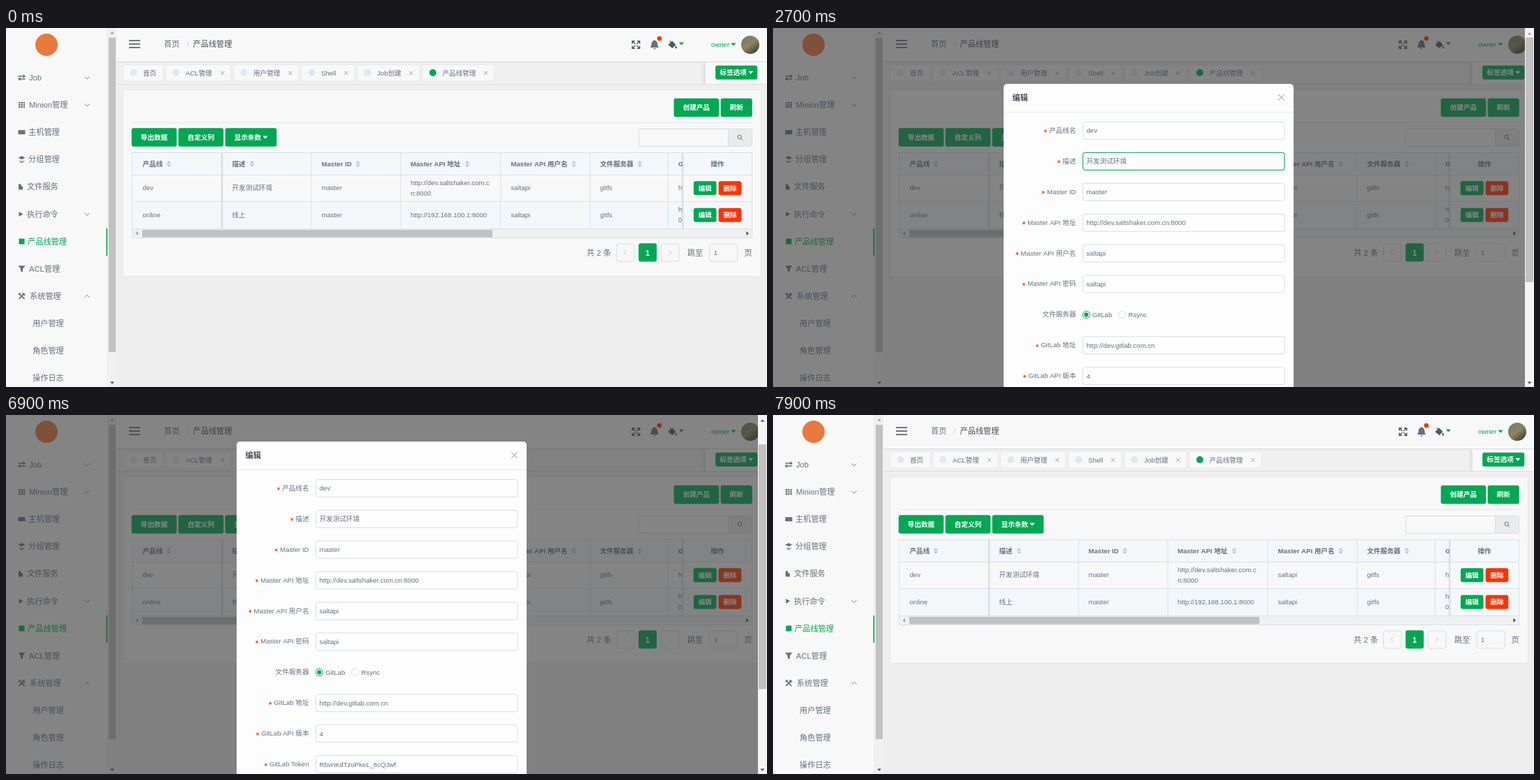
Recreate the animation shown at these times as an HTML page with a canvas. Size 1089 px wide and 514 px high, loop 8000 ms.

```html
<!DOCTYPE html>
<html lang="zh">
<head>
<meta charset="utf-8">
<style>
html, body { margin: 0; width: 100%; height: 100%; overflow: hidden; background: #eee; }
canvas { display: block; width: 1089px; height: 514px; }
</style>
</head>
<body>
<canvas id="stage" width="1089" height="514"></canvas>
<script>
const stage = document.getElementById('stage').getContext('2d');
const layerCanvas = document.createElement('canvas');
layerCanvas.width = 1089;
layerCanvas.height = 514;
const layer = layerCanvas.getContext('2d');
let ctx = stage;

const LOOP = 8000, STEP = 100;
const FONT = '"Liberation Sans", "Noto Sans CJK SC", "Noto Sans CJK", sans-serif';
const GREEN = '#00a854', RED = '#ff3300', TEXT = '#657180', DARK = '#464c5b';
const WHITE = '#f8f8f8', LINE = '#d7dde4', TABLE_LINE = '#d6e2ee', GRAY = '#c1c1c1';
const SMALL = 9.6, LARGE = 11.2;

const clamp = v => Math.max(0, Math.min(1, v));
const smooth = v => { v = clamp(v); return v * v * (3 - 2 * v); };
const ramp = (t, start) => clamp((t - start + STEP) / (2 * STEP));
const pulse = (t, on, off) => Math.min(ramp(t, on), 1 - ramp(t, off));

function rect(x, y, w, h, color) {
  ctx.fillStyle = color;
  ctx.fillRect(x, y, w, h);
}

function box(x, y, w, h, r, fill, stroke) {
  ctx.beginPath();
  ctx.roundRect(x, y, w, h, r);
  if (fill) { ctx.fillStyle = fill; ctx.fill(); }
  if (stroke) { ctx.strokeStyle = stroke; ctx.lineWidth = 1; ctx.stroke(); }
}

function disc(x, y, r, fill, stroke) {
  ctx.beginPath();
  ctx.arc(x, y, r, 0, Math.PI * 2);
  if (fill) { ctx.fillStyle = fill; ctx.fill(); }
  if (stroke) { ctx.strokeStyle = stroke; ctx.lineWidth = 1; ctx.stroke(); }
}

// y is the vertical middle of the line.
function text(s, x, y, { size = SMALL, color = TEXT, bold = false, align = 'left' } = {}) {
  ctx.font = `${bold ? 'bold ' : ''}${size}px ${FONT}`;
  ctx.textAlign = align;
  ctx.fillStyle = color;
  ctx.fillText(s, x, y + size * 0.36);
  return ctx.measureText(s).width;
}

function icon(path, x, y, color, width = 0) {
  const shape = new Path2D(path);
  ctx.save();
  ctx.translate(x, y);
  if (width) {
    ctx.strokeStyle = color;
    ctx.lineWidth = width;
    ctx.stroke(shape);
  } else {
    ctx.fillStyle = color;
    ctx.fill(shape);
  }
  ctx.restore();
}

const CARET = 'M-3.5-2H3.5L0 2.2Z';
const CROSS = 'M-1-1L1 1M1-1L-1 1';

function cross(x, y, r, color) {
  icon(CROSS.replace(/1/g, r), x, y, color, 1);
}

function button(label, x, y, w, h, { fill = GREEN, caret = false, hover = 0, ring = 0 } = {}) {
  if (ring) box(x - 1.5, y - 1, w + 3, h + 2, 4, `rgba(0,168,84,${0.25 * ring})`);
  box(x - 0.3, y - 0.3, w + 0.6, h + 0.6, 3, fill);
  if (hover) box(x, y, w, h, 3, `rgba(255,255,255,${0.2 * hover})`);
  const mid = y + h / 2;
  text(label, x + w / 2 - (caret ? 4.5 : 0), mid, { color: '#fff', bold: true, align: 'center' });
  if (caret) icon(CARET, x + w / 2 + 20.5, mid, '#fff');
}

const MENU = [
  ['Job', 33, 'M-5-2H4M2-4L4.5-2L2 0M5 2H-4M-2 0L-4.5 2L-2 4', 1.3, 'down'],
  ['Minion管理', 33, 'M-4.5-3H4.5M-4.5 0H4.5M-4.5 3H4.5', 'dots', 'down'],
  ['主机管理', 32, 'M-5-3H5V3H-5Z', 0],
  ['分组管理', 32, 'M0-5L5-2.5L0 0L-5-2.5ZM-5 0L0 2.2L5 0L0 2.6ZM-5 2L0 3.2L5 2L0 5Z', 0],
  ['文件服务', 30, 'M-3-4H.5V-1H3V4H-3Z', 0],
  ['执行命令', 30, 'M-2.5-3.5L3.5 0L-2.5 3.5Z', 0, 'down'],
  ['产品线管理', 31, 'M-4-4H4V4H-4Z', 0],
  ['ACL管理', 33, 'M-5-4.5H5L1.5 0V5L-1.5 3V0Z', 0],
  ['系统管理', 34, 'M-4-4L4 4M4-4L-4 4M1-4.2L4.5-1M-4.5-2L-2-4.5', 1.8, 'up'],
  ['用户管理', 38], ['角色管理', 38], ['操作日志', 38],
];

function sidebar() {
  rect(0, 0, 146, 514, WHITE);
  rect(144.5, 0, 1, 514, '#e3e6ea');
  disc(58, 24, 16, '#e8793f');
  MENU.forEach(([label, x, path, width, chevron], i) => {
    const y = 71 + i * 39.1, active = i === 6;
    const color = active ? GREEN : TEXT;
    text(label, x, y, { size: LARGE, color });
    if (width === 'dots') {
      ctx.setLineDash([2.4, 1]);
      icon(path, 22.5, y, color, 2.2);
      ctx.setLineDash([]);
    } else if (path) {
      icon(path, i === 4 || i === 5 ? 21 : 22.5, y, color, width);
    }
    if (chevron) icon(chevron === 'up' ? 'M-3.5 2L0-1.5L3.5 2' : 'M-3.5-1.5L0 2L3.5-1.5', 116, y, '#7d8794', 1);
  });
  rect(143.5, 287, 1.7, 39, GREEN);
  rect(146, 0, 12, 514, '#f0f0f0');
  rect(147, 14, 10, 450, GRAY);
  icon('M-3 1.5H3L0-1.8Z', 152, 7, '#a3a3a3');
  icon('M-3-1.5H3L0 1.8Z', 152, 508, '#505050');
}

function avatar() {
  const g = ctx.createLinearGradient(1054, 12, 1074, 37);
  g.addColorStop(0, '#6d7d70');
  g.addColorStop(0.5, '#8d8260');
  g.addColorStop(1, '#343c33');
  disc(1065, 24, 13, g);
}

function header() {
  rect(158, 0, 931, 48, WHITE);
  rect(158, 48, 931, 1, '#dcdcdc');
  rect(158, 49, 931, 1, '#e7e7e7');
  icon('M-8-5H8M-8 0H8M-8 5H8', 184, 23, DARK, 1.4);
  text('首页', 226, 22.5, { size: LARGE });
  text('/', 258.5, 22.5, { size: LARGE, color: '#c9ced6' });
  text('产品线管理', 267.5, 22.5, { size: LARGE, color: DARK });
  icon('M-1-1L-5-5M1-1L5-5M-1 1L-5 5M1 1L5 5M-5.3-1.5V-5.3H-1.5M5.3-1.5V-5.3H1.5M-5.3 1.5V5.3H-1.5M5.3 1.5V5.3H1.5',
    901.5, 24, '#4f5866', 1.4);
  icon('M-6 4C-3.5 1-5.5-6 0-6.5C5.5-6 3.5 1 6 4ZM-2 5H2L0 7Z', 928, 24, TEXT);
  disc(935, 15, 3.3, RED);
  icon('M-6 0L0-5.5L5 0L0 5ZM5 1Q8 5 5.5 5.5Q3 5 5 1ZM-3-6L0-3L-1-2L-4-5Z', 953.5, 24, '#4f5866');
  icon(CARET, 966.5, 22.5, GREEN);
  text('owner', 1009, 24, { color: GREEN });
  icon(CARET, 1041, 23.5, GREEN);
  avatar();
}

const TABS = [
  ['首页', 168, 225], ['ACL管理', 229, 322], ['用户管理', 326, 419],
  ['Shell', 423, 499], ['Job创建', 503, 592], ['产品线管理', 596.5, 699],
];

function tabs() {
  rect(158, 50, 931, 30, '#f0f0f0');
  TABS.forEach(([label, left, right], i) => {
    box(left - 0.5, 52.5, right - left + 0.5, 23.5, 2, WHITE, '#e6e8eb');
    disc(left + 14.3, 64, 5, i === 5 ? GREEN : '#e2e8ee');
    text(label, left + 28, 64.5);
    if (i) cross(right - 12.3, 64.5, 2.7, '#9aa1ab');
  });
  const shade = ctx.createLinearGradient(994, 0, 1001, 0);
  shade.addColorStop(0, 'rgba(0,0,0,0)');
  shade.addColorStop(1, 'rgba(0,0,0,.07)');
  rect(994, 50, 7, 30, shade);
  rect(1001, 49, 88, 31, WHITE);
  button('标签选项', 1015.5, 54, 59.5, 19.5, { caret: true });
  rect(158, 80, 931, 1, '#dedede');
}

const COLUMNS = [
  ['产品线', 195.5, 233], ['描述', 323.5, 352], ['Master ID', 451.5, 503.5],
  ['Master API 地址', 579, 660], ['Master API 用户名', 722.5, 812.5], ['文件服务器', 850, 907],
];
const ROWS = [
  { y: 229, cells: ['dev', '开发测试环境', 'master', '', 'saltapi', 'gitfs'] },
  { y: 267.5, cells: ['online', '线上', 'master', 'http://192.168.100.1:8000', 'saltapi', 'gitfs'] },
];

function table(t) {
  const rowHover = pulse(t, 900, 1950);
  rect(180, 178, 888, 32, '#f4f7f9');
  rect(181, 248, 887, 39, '#f4f7f9');
  if (rowHover) rect(181, 211, 887, 37, `rgba(235,247,255,${0.7 * rowHover})`);

  ctx.save();
  ctx.beginPath();
  ctx.rect(180, 178, 789, 110);
  ctx.clip();
  for (const [label, x, sortX] of COLUMNS) {
    text(label, x, 194.5, { bold: true, color: TEXT });
    icon('M-3.3-.8H3.3L0-4.4ZM-3.3 .8H3.3L0 4.4Z', sortX, 194.5, '#bfc5ce');
  }
  text('G', 962, 194.5, { bold: true, color: TEXT });
  ROWS.forEach(({ y, cells }) => cells.forEach((s, i) => text(s, COLUMNS[i][1], y)));
  text('http://dev.saltshaker.com.c', 579, 222);
  text('n:8000', 579, 236.5);
  text('http', 962, 229);
  text('http', 962, 260);
  text('0', 962, 274.5);
  ctx.restore();

  for (const x of [437, 565, 708, 836, 947.5]) rect(x - 0.5, 178, 1, 109, TABLE_LINE);
  for (const y of [178, 210, 248, 287]) rect(180, y, 888, 1, TABLE_LINE);
  rect(308, 178, 1.3, 109, '#cdd5de');
  rect(309.3, 178, 2, 109, 'rgba(0,0,0,.04)');
  rect(966, 178, 2, 109, 'rgba(0,0,0,.04)');
  rect(968, 178, 1.3, 109, '#cdd5de');

  text('操作', 1018, 194.5, { bold: true, color: TEXT, align: 'center' });
  ROWS.forEach(({ y }, i) => {
    const state = i ? {} : { hover: pulse(t, 1400, 1950), ring: t >= 1700 && t < 7400 ? 1 : 0 };
    button('编辑', 984.3, y - 9.5, 32, 19.5, state);
    button('删除', 1020, y - 9.5, 32, 19.5, { fill: RED });
  });

  rect(181, 288, 886, 12, '#f0f0f0');
  rect(195, 289, 501, 10.5, GRAY);
  icon('M1.5-3V3L-1.8 0Z', 187.5, 294, '#a3a3a3');
  icon('M-1.5-3V3L1.8 0Z', 1061, 294, '#404040');
  ctx.strokeStyle = TABLE_LINE;
  ctx.lineWidth = 1;
  ctx.strokeRect(180.5, 178.5, 887, 122);
}

function pager() {
  const y = 321.5, opts = { size: LARGE };
  text('共 2 条', 831, y, opts);
  box(873.5, 309, 25.5, 25, 3, WHITE, LINE);
  icon('M1.5-3.5L-2 0L1.5 3.5', 886, y, '#bcc3cc', 1);
  box(905.2, 308.3, 26, 26.2, 3, GREEN);
  text('1', 918, y, { size: LARGE, color: '#fff', bold: true, align: 'center' });
  box(937.5, 309, 25.5, 25, 3, WHITE, LINE);
  icon('M-1.5-3.5L2 0L-1.5 3.5', 950, y, '#bcc3cc', 1);
  text('跳至', 975, y, opts);
  box(1007, 309, 40, 25, 3, WHITE, LINE);
  text('1', 1013, y);
  text('页', 1056.5, y, opts);
}

function page(t) {
  rect(0, 0, 1089, 514, '#eeeeee');
  sidebar();
  header();
  tabs();
  box(167.5, 88.5, 913, 267, 2, WHITE, '#e6e6e6');
  button('创建产品', 956, 101, 64, 26);
  button('刷新', 1023, 101, 44.5, 26);
  rect(180, 135, 888, 1, '#e3e8ee');
  button('导出数据', 180, 143.5, 64, 26);
  button('自定义列', 247, 143.5, 64, 26);
  button('显示条数', 314, 143.5, 73, 26, { caret: true });
  box(905.5, 144.5, 162, 25, 3, '#ebebeb', LINE);
  box(905.5, 144.5, 128, 25, [3, 0, 0, 3], WHITE, LINE);
  icon('M1.2 1.2L3.5 3.5M2 -1A2.7 2.7 0 1 1-3.4-1A2.7 2.7 0 1 1 2-1', 1050.5, 157, TEXT, 1);
  table(t);
  pager();
}

const MODAL = { x: 330, y: 80, w: 415, h: 636 };
const FIELDS = [
  ['产品线名', 'dev'], ['描述', '开发测试环境'], ['Master ID', 'master'],
  ['Master API 地址', 'http://dev.saltshaker.com.cn:8000'],
  ['Master API 用户名', 'saltapi'], ['Master API 密码', 'saltapi'],
  ['文件服务器', null], ['GitLab 地址', 'http://dev.gitlab.com.cn'],
  ['GitLab API 版本', '4'], ['GitLab Token', 'RbvnKdTzoPkeL_8cQJwf'],
  ['GitLab State 项目', 'root/salt_sls'], ['GitLab Pillar 项目', 'root/salt_pillar'],
];
// Pointer visits: field, enter time, leave time.
const VISITS = [[1, 2600, 4400], [11, 5300, 5400], [1, 6700, 6700], [0, 6800, 6800]];
// Scroll offset from a given time on.
const SCROLL = [[0, 0], [4000, 51], [4100, 150], [4200, 202], [6400, 110], [6500, 42]];
const scrollAt = t => SCROLL.filter(([start]) => start <= t).pop()[1];

function field(label, value, i, t) {
  const y = 67 + i * 43.9;
  const width = text(label, 103.5, y - 0.5, { align: 'right' });
  if (value === null) {
    disc(118.3, y, 5.2, null, GREEN);
    disc(118.3, y, 3.1, GREEN);
    text('GitLab', 127, y);
    disc(169.5, y, 5.2, null, LINE);
    text('Rsync', 178.5, y);
    return;
  }
  icon('M0-2.2V2.2M-1.9-1.1L1.9 1.1M1.9-1.1L-1.9 1.1', 98.3 - width, y + 0.5, RED, 0.9);
  box(113.5, y - 12.5, 288.5, 25, 3, null, LINE);
  for (const [row, on, off] of VISITS) {
    const glow = row === i ? pulse(t, on, off) : 0;
    if (glow) box(113.5, y - 12.5, 288.5, 25, 3, null, `rgba(0,168,84,${glow})`);
  }
  text(value, 118.5, y);
}

function modalContent(t) {
  const { w, h } = MODAL;
  box(0, 0, w, h, 5, '#fdfdfd');
  text('编辑', 12.5, 19.5, { size: LARGE, bold: true, color: DARK });
  cross(397.5, 19.3, 4.4, t >= 7100 ? '#444' : '#8a9099');
  rect(0, 40, w, 1, '#e5e9ee');
  FIELDS.forEach(([label, value], i) => field(label, value, i, t));
  rect(0, 593, w, 1, '#e3e8ee');
  box(302.5, 603.5, 44, 25, 3, null, LINE);
  text('重置', 324.5, 616, { align: 'center' });
  const hover = pulse(t, 5500, 6100);
  if (hover) {
    const color = `rgba(0,168,84,${hover})`;
    box(302.5, 603.5, 44, 25, 3, null, color);
    text('重置', 324.5, 616, { align: 'center', color });
  }
  button('提交', 356, 603.5, 45, 25.5);
}

// The dialog is painted on its own layer so that it fades as one piece.
function modal(t, scroll, scale, alpha) {
  const { x, y, w, h } = MODAL;
  layer.clearRect(0, 0, 1089, 514);
  ctx = layer;
  ctx.save();
  ctx.translate(x + w / 2, y - scroll + h / 2);
  ctx.scale(scale, scale);
  ctx.translate(-w / 2, -h / 2);
  modalContent(t);
  ctx.restore();
  ctx = stage;
  ctx.globalAlpha = alpha;
  ctx.drawImage(layerCanvas, 0, 0);
  ctx.globalAlpha = 1;
}

function modalScrollbar(scroll, scale) {
  const content = MODAL.y + MODAL.h * (1 + scale) / 2, track = 488;
  rect(1076, 0, 13, 514, '#f4f4f4');
  rect(1077, 13.5 + scroll * track / content, 11, 514 * track / content, GRAY);
  icon('M-3 1.5H3L0-1.8Z', 1082.5, 8, scroll ? '#505050' : '#a3a3a3');
  icon('M-3-1.5H3L0 1.8Z', 1082.5, 508, scroll < 202 ? '#505050' : '#a3a3a3');
}

function draw(t) {
  page(t);
  if (t < 2000 || t >= 7900) return;
  const scroll = scrollAt(t);
  const shown = smooth((t - 1890) / 250) * (1 - smooth((t - 7535) / 250));
  const mask = 0.6 * clamp((t - 1930) / 300) * (1 - clamp((t - 7540) / 300));
  rect(0, 0, 1089, 514, `rgba(55,55,55,${mask})`);
  if (shown > 0) {
    const scale = 0.9 + 0.1 * shown;
    modal(t, scroll, scale, shown);
    modalScrollbar(scroll, scale);
  }
}

const origin = performance.now();
function tick() {
  const t = (performance.now() - origin) % LOOP;
  draw(Math.floor(t / STEP) * STEP);
  requestAnimationFrame(tick);
}
tick();
</script>
</body>
</html>
```
